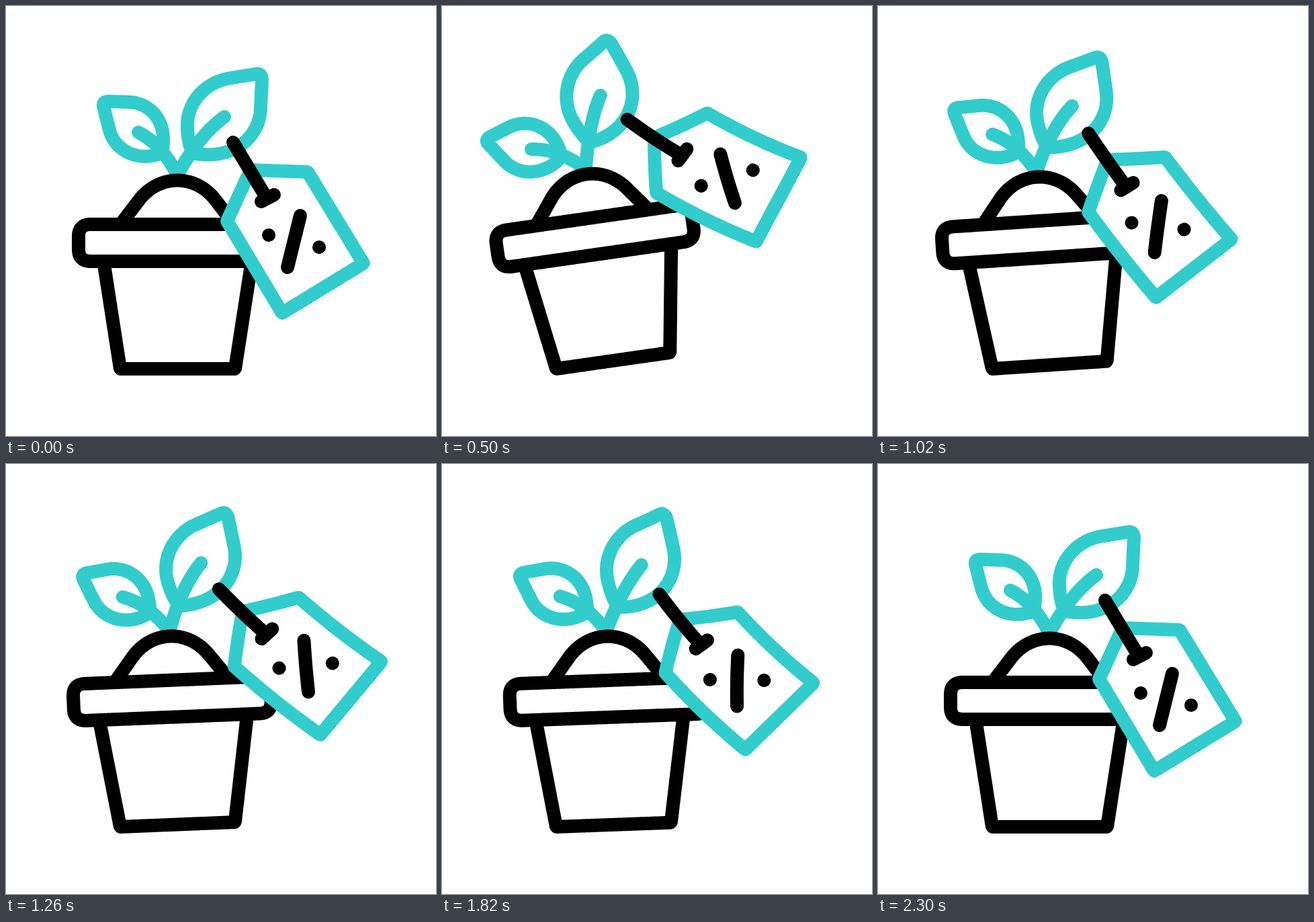
An HTML page with a canvas that plays this animation: 640 px wide and 640 px high, repeating every 2.66 s.

```html
<!DOCTYPE html>
<html lang="en">
<head>
<meta charset="utf-8">
<title>Potted plant with a discount tag</title>
<style>
  html, body { margin: 0; width: 100%; height: 100%; overflow: hidden; background: #fff; }
  canvas { display: block; width: 640px; height: 640px; }
</style>
</head>
<body>
<canvas id="stage" width="640" height="640"></canvas>
<script>
const LOOP = 2660;
const TEAL = '#33cccc', BLACK = '#000', WHITE = '#fff';
const ctx = document.getElementById('stage').getContext('2d');
const rad = deg => deg * Math.PI / 180;

// Turn path data into closely spaced points so it can be bent.
function shape(d, color, fill) {
  const path = document.createElementNS('http://www.w3.org/2000/svg', 'path');
  path.setAttribute('d', d);
  const len = path.getTotalLength();
  const n = Math.max(1, Math.ceil(len / 2));
  const pts = Array.from({ length: n + 1 }, (_, i) => {
    const p = path.getPointAtLength(len * i / n);
    return [p.x, p.y];
  });
  return { pts, color, fill, closed: /z$/i.test(d) };
}

const leftLeaf = [
  shape('M152 142L185 143C213 145 235 168 234 200Q234 212 231 219C200 232 165 218 155 188Q150 170 145 149Q144 142 152 142Z', TEAL),
  shape('M197 188Q232 206 254 250', TEAL)
];
const rightLeaf = [
  shape('M373 101L330 108C295 115 268 145 270 182Q271 205 278 219C303 224 335 222 358 200Q378 180 379 152L381 109Q380 100 373 101Z', TEAL),
  shape('M325 165Q288 192 257 248', TEAL)
];
const pot = [
  shape('M172 323L198 289C228 249.7 282 249.7 312 289L338 323', BLACK, WHITE),
  shape('M146 385L170 540L341 540L365 385', BLACK, WHITE),
  shape('M126 325H384Q402 325 402 343V362Q402 380 384 380H126Q108 380 108 362V343Q108 325 126 325Z', BLACK, WHITE)
];
const tag = [
  shape('M364 244L449 247L532 383L411 457L329 320Z', TEAL, WHITE),
  shape('M338 203L388 286', BLACK),
  shape('M380 291L399 281', BLACK),
  shape('M438 312L419 389', BLACK),
  shape('M391 341h.1', BLACK),
  shape('M466 359h.1', BLACK)
];

const STEM = [255, 250], HOOK = [338, 203];
const POT_T = [200, 480, 800, 1130, 1420, 1700, 2000, 2300];
const LEAF_T = [200, 500, 830, 1150, 1450, 1730, 2030, 2300];
const TAG_T = [200, 500, 840, 1160, 1460, 1740, 2040, 2300];

// Sine-eased swing between the extremes.
function swing(t, times, values) {
  if (t <= times[0] || t >= times[times.length - 1]) return 0;
  const i = times.findIndex(x => x > t) - 1;
  const u = (t - times[i]) / (times[i + 1] - times[i]);
  return values[i] + (values[i + 1] - values[i]) * (1 - Math.cos(Math.PI * u)) / 2;
}

function rotate([x, y], [cx, cy], deg) {
  const c = Math.cos(rad(deg)), s = Math.sin(rad(deg));
  const dx = x - cx, dy = y - cy;
  return [cx + dx * c - dy * s, cy + dx * s + dy * c];
}

// Rotation that grows with distance from the centre.
const bend = (center, deg, k, ref) => p =>
  rotate(p, center, deg + k * (Math.hypot(p[0] - center[0], p[1] - center[1]) - ref));

function draw(shapes, move) {
  for (const s of shapes) {
    ctx.beginPath();
    s.pts.forEach(p => ctx.lineTo(...move(p)));
    if (s.closed) ctx.closePath();
    if (s.fill) {
      ctx.fillStyle = s.fill;
      ctx.fill();
    }
    ctx.strokeStyle = s.color;
    ctx.stroke();
  }
}

function render(t) {
  const tilt = swing(t, POT_T, [0, -8.3, 8.5, -7.8, 5.1, -4.6, 2.5, 0]);
  const left = swing(t, LEAF_T, [0, -19.7, 25, -19, 12.5, -12, 4, 0]);
  const right = swing(t, LEAF_T, [0, -19.5, 16, -19, 5, -12, 3, 0]);
  const curl = swing(t, LEAF_T, [0, -.03, .05, -.03, .06, -.045, .02, 0]);
  const hang = swing(t, TAG_T, [0, -28.3, 29, -28, 14.3, -14.3, 6, 0]);
  const flex = swing(t, TAG_T, [0, -.03, .012, -.03, .004, -.036, .01, 0]);
  const pull = swing(t, TAG_T, [0, -11.4, 11, -11, 2.5, -3, 1.5, 0]);

  // The pot rocks on whichever bottom corner it leans toward.
  const pivot = tilt < 0 ? [170, 540] : [341, 540];
  const rock = p => rotate(p, pivot, tilt);
  const bendLeft = bend(STEM, left, curl / 3, 85);
  const bendRight = bend(STEM, right, curl, 110);
  const bendTag = bend(HOOK, hang, flex, 190);
  const hook = rock(rotate(HOOK, STEM, pull));

  ctx.fillStyle = WHITE;
  ctx.fillRect(0, 0, 640, 640);
  ctx.lineWidth = 20;
  ctx.lineCap = ctx.lineJoin = 'round';
  draw(leftLeaf, p => rock(bendLeft(p)));
  draw(rightLeaf, p => rock(bendRight(p)));
  draw(pot, rock);
  draw(tag, p => {
    const [x, y] = bendTag(p);
    return [x + hook[0] - HOOK[0], y + hook[1] - HOOK[1]];
  });
}

const start = performance.now();
function tick() {
  render((performance.now() - start) % LOOP);
  requestAnimationFrame(tick);
}
tick();
</script>
</body>
</html>
```
